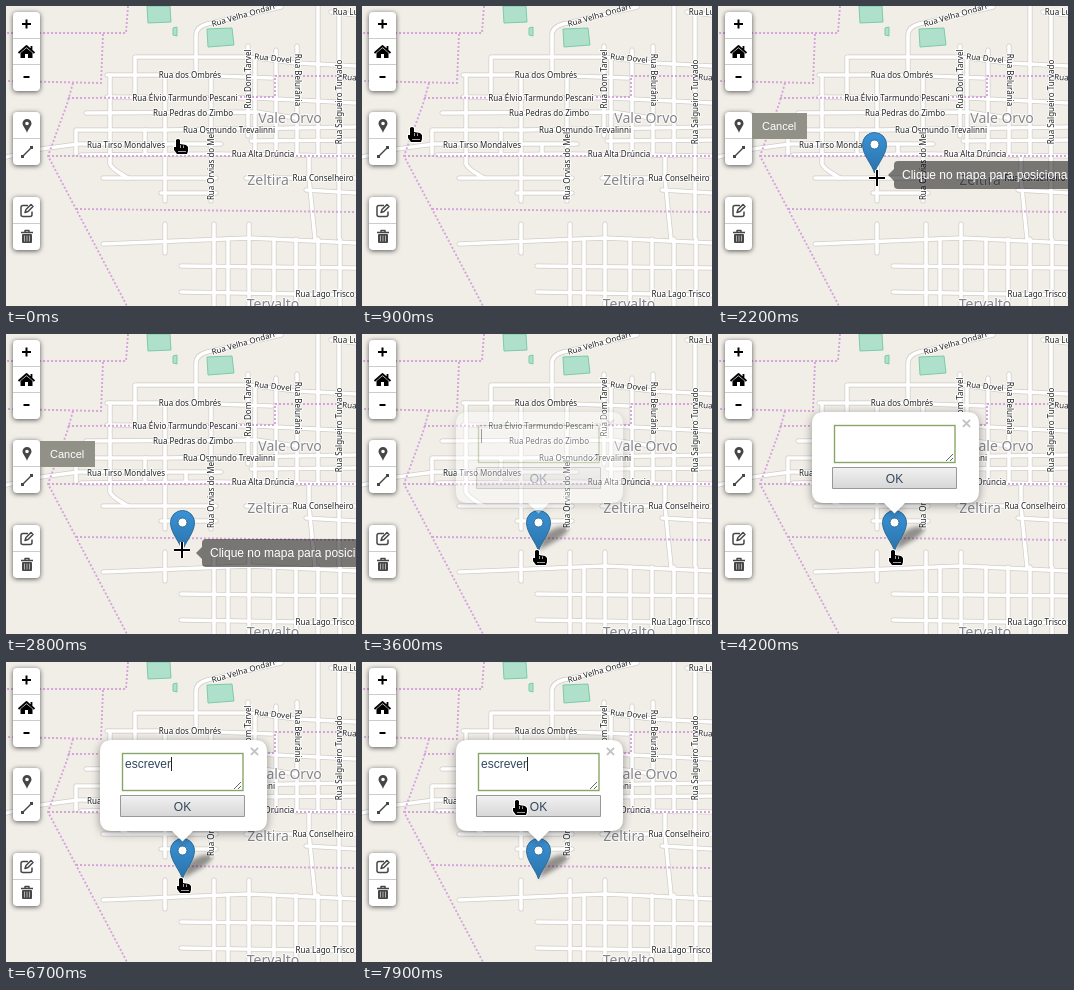
An HTML page with a canvas that plays this animation: 350x300 px, repeating every 8000 ms.

```html
<!DOCTYPE html>
<html lang="pt">
<head>
<meta charset="utf-8">
<style>
html, body { margin: 0; width: 350px; height: 300px; overflow: hidden; }
canvas { display: block; }
</style>
</head>
<body>
<canvas id="stage" width="350" height="300"></canvas>
<script>
const stage = document.getElementById('stage');
const layer = stage.cloneNode().getContext('2d');
let ctx = stage.getContext('2d');
const LOOP = 8000, STEP = 100;
const MAP_FONT = '"Noto Sans", sans-serif';
const UI_FONT = '"Liberation Sans", Arial, sans-serif';

const streets = [
  'M129 92V51H242L290 57L350 60', 'M101 69L180 69L266 72', 'M101 91L250 92L350 97',
  'M80 107L250 106L290 112', 'M70 148V124L160 124L350 121', 'M0 151L35 143L72 138L215 138',
  'M75 149L210 148L350 150', 'M97 172H210M240 172H350', 'M155 187H210M300 184L350 187',
  'M97 238L243 232L350 237', 'M175 260L350 262', 'M175 286L350 289', 'M245 135L350 134',
  'M190 69V29Q190 21 201 18L275 1', 'M325 6L350 9', 'M338 72H350',
  'M104 69V158Q106 163 122 172', 'M159 69V195', 'M159 218V247', 'M205 69V195',
  'M208 218V300', 'M242 40V130', 'M249 51V150', 'M270 44V150', 'M291 40V150',
  'M312 0V150', 'M303 150V172L309 233', 'M333 10V232', 'M222 233V300', 'M243 218V300',
  'M268 233V300', 'M290 233V300', 'M312 233V300', 'M334 233V300', 'M139 124V149', 'M180 138V149'
].map(d => new Path2D(d));

const borders = new Path2D('M122 0L120 27H0M97 28L95 77L0 75M67 77L61 98L42 150L70 203L121 300' +
  'M62 92L240 91H269V70H350M42 150H350M70 203L350 206');
const parks = new Path2D('M141 0H164L165 16L142 17ZM167 22L171 21V30L167 29ZM201 23L226 22L228 39L202 41Z');

// text, centre x, centre y, rotation in degrees
const labels = [
  ['Rua Velha Ondari', 237, 9, -16], ['Rua Dovel', 267, 52, 6], ['Rua Dom Tarvel', 242, 73, -90],
  ['Rua Belurânia', 292, 74, 90], ['Rua dos Ombrés', 184, 69, 0],
  ['Rua Élvio Tarmundo Pescani', 179, 92, 0], ['Rua Pedras do Zimbo', 187, 107, 0],
  ['Rua Osmundo Trevalinni', 223, 124, 0], ['Rua Tirso Mondalves', 120, 139, 0],
  ['Rua Alta Drúncia', 257, 148, 0], ['Rua Orvias do Mel', 205, 160, -90],
  ['Rua Salgueiro Turvado', 333, 96, -90], ['Rua Conselheiro D', 321, 172, 0],
  ['Rua Lago Trisco', 319, 288, 0], ['Rua Luvel', 345, 6, 0], ['Rua Orlim', 355, 72, 4]
];
const districts = [['Vale Orvo', 284, 112], ['Zeltira', 262, 174], ['Tervalto', 267, 298]];

// time, x, y of the pointer while the marker is being placed
const placing = [
  [1500, 30, 120], [1600, 38, 122], [1700, 48, 125], [1800, 61, 128], [1900, 92, 141],
  [2000, 118, 148], [2100, 141, 159], [2200, 159, 172], [2300, 168, 187], [2400, 169, 205],
  [2800, 176, 216]
];
const keyTimes = [4600, 4900, 5200, 5400, 5900, 6200, 6400, 6700];

const handShape = new Path2D('M-2 1Q0 -1 2 1L2 5L8 6L10 8V12L9 15H-1L-4 11V8L-2 8Z');
const handLines = new Path2D('M2.5 6V9M5.5 6.5V9M0 12.5H8');
const arrowShape = new Path2D('M0 0V15L4 12L7 18L9 17L7 11H11Z');
const crossShape = new Path2D('M0 -8V8M-8 0H8');
const pinShape = new Path2D('M0 0C-2 -8 -12 -18 -12 -28.5A12 12 0 0 1 12 -28.5C12 -18 2 -8 0 0Z');
const smallPin = new Path2D('M0 7C-1 3 -4.5 0 -4.5 -2.5A4.5 4.5 0 0 1 4.5 -2.5C4.5 0 1 3 0 7ZM1.8 -2.5A1.8 1.8 0 1 0 -1.8 -2.5A1.8 1.8 0 1 0 1.8 -2.5Z');

function at(x, y, draw) {
  ctx.save();
  ctx.translate(x, y);
  draw();
  ctx.restore();
}

// Paints a group on its own layer, then blends it in as one piece.
function faded(alpha, draw) {
  const base = ctx;
  ctx = layer;
  ctx.clearRect(0, 0, 350, 300);
  ctx.save();
  draw();
  ctx.restore();
  ctx = base;
  ctx.globalAlpha = alpha;
  ctx.drawImage(layer.canvas, 0, 0);
  ctx.globalAlpha = 1;
}

function fill(path, color, rule = 'nonzero') {
  ctx.fillStyle = color;
  ctx.fill(path, rule);
}

function stroke(path, color, width) {
  ctx.strokeStyle = color;
  ctx.lineWidth = width;
  ctx.stroke(path);
}

function rect(x, y, w, h, color, radius = 0) {
  const path = new Path2D();
  path.roundRect(x, y, w, h, radius);
  fill(path, color);
}

function write(text, x, y, font, color, align = 'left') {
  ctx.font = font;
  ctx.textAlign = align;
  ctx.fillStyle = color;
  ctx.fillText(text, x, y);
}

function haloText(text, x, y, angle, size, color) {
  at(x, y, () => {
    ctx.rotate(angle * Math.PI / 180);
    ctx.strokeStyle = 'rgba(255,255,255,.8)';
    ctx.lineWidth = 2;
    ctx.font = `${size}px ${MAP_FONT}`;
    ctx.textAlign = 'center';
    ctx.strokeText(text, 0, size * .36);
    ctx.fillStyle = color;
    ctx.fillText(text, 0, size * .36);
  });
}

function drawMap() {
  rect(0, 0, 350, 300, '#f1eee8');
  fill(parks, '#aee0cb');
  stroke(parks, '#7dcba8', 1);
  ctx.lineCap = ctx.lineJoin = 'round';
  for (const s of streets) stroke(s, '#d0cdc8', 5);
  for (const s of streets) stroke(s, '#fff', 3.6);
  ctx.lineCap = 'butt';
  ctx.setLineDash([2, 2]);
  stroke(borders, '#d6a3da', 1.9);
  ctx.setLineDash([]);
  for (const [text, x, y] of districts) haloText(text, x, y, 0, 14, '#85858a');
  for (const [text, x, y, angle] of labels) haloText(text, x, y, angle, 8, '#222');
}

function drawBar(y, cells) {
  ctx.save();
  ctx.shadowColor = 'rgba(0,0,0,.65)';
  ctx.shadowBlur = 5;
  ctx.shadowOffsetY = 1;
  rect(7, y, 27, cells * 26 + 1, '#fff', 4);
  ctx.restore();
  for (let i = 1; i < cells; i++) rect(7, y + i * 26, 27, 1, '#ccc');
}

function drawControls() {
  const ink = '#464646';
  drawBar(6, 3);
  drawBar(106, 2);
  drawBar(191, 2);
  rect(16, 17, 9, 2, '#000');
  rect(19.5, 13.5, 2, 9, '#000');
  rect(17.5, 70, 6, 2, '#000');
  at(20.5, 46, () => {
    fill(new Path2D('M-6 1V6H-1.5V2H1.5V6H6V1L0 -4Z'), '#000');
    stroke(new Path2D('M-8 1L0 -6L8 1M5 -6V-2'), '#000', 1.8);
  });
  at(21, 120, () => fill(smallPin, ink, 'evenodd'));
  at(21, 146, () => {
    stroke(new Path2D('M-4 4L4 -4'), ink, 1.4);
    rect(-6, 3, 3, 3, ink);
    rect(3, -6, 3, 3, ink);
  });
  at(21, 204.5, () => {
    stroke(new Path2D('M1 -5H-4Q-6 -5 -6 -3V4Q-6 6 -4 6H3Q5 6 5 4V1'), ink, 1.5);
    stroke(new Path2D('M-2 2L-1 -1L4 -6L6 -4L1 1Z'), ink, 1.5);
  });
  at(21, 230.5, () => {
    stroke(new Path2D('M-6 -4H6M-2 -4V-6H2V-4'), ink, 1.5);
    rect(-5, -2.5, 10, 9, ink, 1);
    stroke(new Path2D('M-2.5 -1V5M0 -1V5M2.5 -1V5'), '#bbb', .9);
  });
}

function drawPin(x, y, shadow) {
  at(x + .5, y, () => {
    if (shadow) {
      ctx.save();
      ctx.transform(.8, 0, -.6, .6, 0, 0);
      ctx.filter = 'blur(2px)';
      fill(pinShape, 'rgba(0,0,0,.4)');
      ctx.restore();
    }
    const blue = ctx.createLinearGradient(0, -41, 0, 0);
    blue.addColorStop(0, '#3a93d8');
    blue.addColorStop(1, '#2b72aa');
    fill(pinShape, blue);
    stroke(pinShape, '#2e6c97', 1);
    const dot = new Path2D();
    dot.arc(0, -28.5, 4.5, 0, 7);
    fill(dot, '#fff');
    stroke(dot, '#2e6c97', 1);
  });
}

function drawTooltip(x, y) {
  const shade = 'rgba(0,0,0,.5)';
  at(x, y, () => {
    rect(20, -12, 260, 28, shade, 4);
    fill(new Path2D('M20 -4L14 2L20 8Z'), shade);
    write('Clique no mapa para posicionar o marcador.', 28, 6, `12px ${UI_FONT}`, '#fff');
  });
}

function drawPopup(t) {
  const bubble = new Path2D('M106 78H249Q261 78 261 90V157Q261 169 249 169H187L176.5 179.5L166 169H106Q94 169 94 157V90Q94 78 106 78Z');
  ctx.shadowColor = 'rgba(0,0,0,.4)';
  ctx.shadowBlur = 10;
  ctx.shadowOffsetY = 2;
  fill(bubble, '#fff');
  ctx.shadowColor = 'transparent';
  write('×', 248.5, 95, `bold 17px ${UI_FONT}`, '#c3c3c3', 'center');

  ctx.strokeStyle = '#8aa56a';
  ctx.lineWidth = 1.4;
  ctx.strokeRect(116.5, 91.5, 120.5, 37);
  stroke(new Path2D('M228 127L235 120M232 127L235 124'), '#666', 1);
  const typed = 'escrever'.slice(0, keyTimes.filter(k => t >= k).length);
  write(typed, 119, 106, `12px ${UI_FONT}`, '#2f4660');
  const caretOff = t >= 4200 && t < 4600 || t >= 7300 && t < 7900;
  if (!caretOff) rect(119 + Math.round(ctx.measureText(typed).width), 95, 1, 14, '#222');

  const pressed = t >= 7700 && t < 7900;
  const face = ctx.createLinearGradient(0, 133, 0, 155);
  face.addColorStop(0, pressed ? '#d2d2d2' : '#f2f2f2');
  face.addColorStop(1, pressed ? '#e2e2e2' : '#d6d6d6');
  rect(114, 133, 125, 22, '#989898', 1);
  rect(115, 134, 123, 20, face);
  write('OK', 176.5, 148.5, `12px ${UI_FONT}`, '#33475f', 'center');
}

function pointer(t) {
  const glide = (from, to, start, steps) => {
    const p = Math.min(1, Math.max(0, (t - start + STEP) / (steps * STEP)));
    const e = p * p * (3 - 2 * p);
    return from.map((v, i) => Math.round(v + (to[i] - v) * e));
  };
  if (t < 1500) return glide([172, 133], [27, 119], 400, 8);
  if (t < 3600) return placing.findLast(p => t >= p[0]).slice(1);
  return glide([175, 216], [155, 138], 7200, 4);
}

function drawCursor(x, y, t) {
  at(x, y, () => {
    if (t >= 1900 && t < 3600) {
      stroke(crossShape, '#fff', 4);
      stroke(crossShape, '#000', 2);
      return;
    }
    const arrow = t >= 1600 && t < 1900;
    const shape = arrow ? arrowShape : handShape;
    stroke(shape, '#fff', 2);
    fill(shape, '#000');
    if (!arrow) stroke(handLines, '#ccc', .8);
  });
}

function draw(t) {
  const [x, y] = pointer(t);
  const pin = t >= 2800 ? [176, 217] : [x - 3, y - 5];
  const placed = t >= 3600;
  drawMap();
  if (t >= 1900) drawPin(...pin, placed);
  if (t >= 1900 && !placed) drawTooltip(...pin);
  if (placed) faded(Math.min(1, .4 + (t - 3600) / 250), () => drawPopup(t));
  drawControls();
  if (t >= 1500 && !placed) {
    const hover = t >= 1600 && t < 1900;
    rect(34, 107, 55, 26, hover ? '#a0a098' : '#919187');
    write('Cancel', 44, 124, `11px ${UI_FONT}`, '#fff');
  }
  drawCursor(x, y, t);
}

let shown = -1;
function tick(now) {
  const t = Math.floor(now % LOOP / STEP) * STEP;
  if (t !== shown) draw(shown = t);
  requestAnimationFrame(tick);
}
requestAnimationFrame(tick);
</script>
</body>
</html>
```
